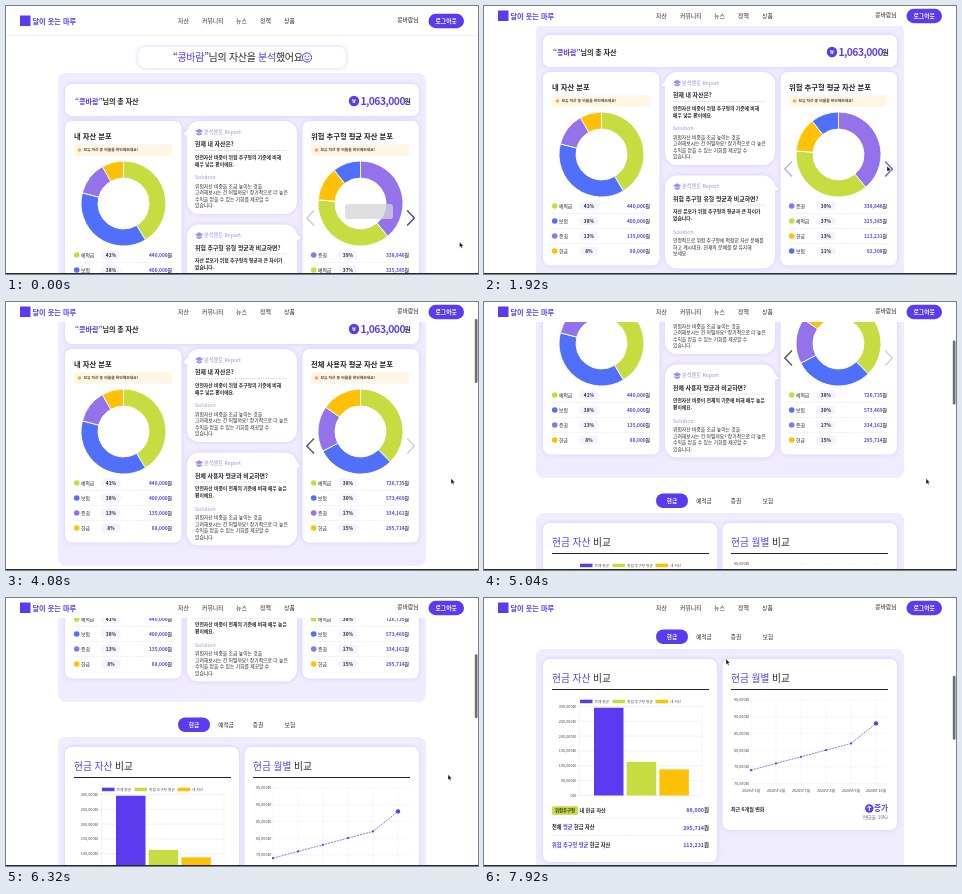
Animation, 472 px wide and 268 px high, one loop 8 s. Source, as an HTML page:

```html
<!DOCTYPE html>
<html lang="ko">
<head>
<meta charset="utf-8">
<title>자산 분석</title>
<style>
html,body{margin:0;width:100%;height:100%;overflow:hidden;background:#fff}
svg{display:block;width:472px;height:268px}
text{font-family:"Noto Sans CJK KR","Noto Sans CJK JP","Noto Sans CJK","Noto Sans",sans-serif;white-space:pre}
.glow{filter:drop-shadow(0 0 2px #d3c8ff)}
</style>
</head>
<body>
<svg id="stage" viewBox="0 0 472 268"></svg>
<script>
const NS = 'http://www.w3.org/2000/svg';
const MAIN = '#5a3bf0', INK = '#26262b', SOFT = '#a08df2', LAV = '#f0ecff';
const LIME = '#c6dc40', BLUE = '#5070fb', VIOLET = '#9473ea', GOLD = '#ffc107';
const LOOP = 8000, SWAP = 2240;
const USER = '콩바람';
const stage = document.getElementById('stage');

function el(parent, tag, attrs = {}) {
  const e = document.createElementNS(NS, tag);
  for (const k in attrs) e.setAttribute(k, attrs[k]);
  parent.appendChild(e);
  return e;
}
const group = p => el(p, 'g');
const box = (p, x, y, w, h, fill, r = 0, extra = {}) =>
  el(p, 'rect', { x, y, width: w, height: h, rx: r, fill, ...extra });
const card = (p, x, y, w, h, r = 7) => box(p, x, y, w, h, '#fff', r, { class: 'glow' });
const dot = (p, cx, cy, r, fill) => el(p, 'circle', { cx, cy, r, fill });
const path = (p, d, stroke, width = 1, extra = {}) =>
  el(p, 'path', { d, stroke, 'stroke-width': width, fill: 'none', ...extra });
const rule = (p, x1, x2, y, color = '#d9d7e2') =>
  path(p, `M${x1} ${y}H${x2}`, color, 0.5, { 'stroke-dasharray': '1.2 1' });

// Text centred on y; parts between asterisks take the accent colour.
function text(p, x, y, str, size, o = {}) {
  const t = el(p, 'text', {
    x, y: y + size * 0.37, 'font-size': size, 'font-weight': o.w || 400,
    fill: o.fill || INK, 'text-anchor': o.a || 'start', 'letter-spacing': (o.ls || 0) * size
  });
  str.split('*').forEach((s, i) => {
    if (s) el(t, 'tspan', i % 2 ? { fill: MAIN } : {}).textContent = s;
  });
  return t;
}

const page = group(stage);

// Headline and total
card(page, 132, 41, 208, 21);
text(page, 167, 51.5, `“*${USER}*”님의 자산을 *분석*했어요`, 10, { w: 500, ls: -0.03 });
el(page, 'circle', { cx: 301, cy: 51.5, r: 4.6, fill: 'none', stroke: MAIN, 'stroke-width': 1 });
path(page, 'M298.7 52.6Q301 55.6 303.3 52.6', MAIN, 0.9);
dot(page, 299.4, 50.2, 0.7, MAIN);
dot(page, 302.6, 50.2, 0.7, MAIN);

box(page, 52, 67, 368, 265, LAV, 8);
card(page, 59, 78, 354, 32);
text(page, 69, 95.5, `*“${USER}”*님의 총 자산`, 7.1, { w: 700, ls: -0.01 });
dot(page, 348, 95, 5.2, MAIN);
text(page, 348, 95, '₩', 5.6, { fill: '#fff', a: 'middle', w: 700 });
text(page, 399, 95, '*1,063,000*', 10.3, { w: 700, a: 'end', ls: -0.05 });
text(page, 398.6, 95.6, '원', 6.8, { w: 700 });

// Donut charts
function ring(x, a, b) {
  const pt = (r, q) => `${(x + r * Math.sin(q)).toFixed(2)} ${(197.5 - r * Math.cos(q)).toFixed(2)}`;
  const R = 42.5, r = 25.5, big = b - a > Math.PI ? 1 : 0;
  return `M${pt(R, a)}A${R} ${R} 0 ${big} 1 ${pt(R, b)}L${pt(r, b)}A${r} ${r} 0 ${big} 0 ${pt(r, a)}Z`;
}
const shares = vals => {
  const sum = vals.reduce((a, b) => a + b);
  return vals.map(v => v / sum);
};
function donut(p, x) {
  const arcs = [0, 1, 2, 3].map(() => path(p, '', '#fff', 0.9));
  return (parts, colors) => {
    let a = 0;
    parts.forEach((s, i) => {
      const b = a + s * Math.PI * 2;
      arcs[i].setAttribute('d', ring(x, a, b));
      arcs[i].setAttribute('fill', colors[i]);
      a = b;
    });
  };
}
function assetHead(p, x, title) {
  text(p, x, 130, title, 7.3, { w: 700 });
  box(p, x, 138, 98, 12, '#fff6e5', 2);
  dot(p, x + 5.5, 144, 1.8, '#f6a94a');
  text(p, x + 9.5, 144, '보유 자산 중 비율을 확인해보세요!', 3.8, { w: 700, fill: '#54442e' });
}
function assetRows(p, x, set) {
  shares(set.vals).forEach((s, i) => {
    const y = 249 + i * 15;
    dot(p, x + 2.7, y, 2.8, set.colors[i]);
    text(p, x + 7, y, set.names[i], 4.8, { w: 500 });
    box(p, x + 27, y - 4.5, 20, 9, '#f5f3ff', 4.5);
    text(p, x + 37, y, Math.round(s * 100) + '%', 4.8, { w: 700, a: 'middle' });
    text(p, x + 98, y, `*${set.vals[i].toLocaleString('en-US')}*원`, 4.8, { w: 700, a: 'end' });
    if (i < 3) rule(p, x, x + 98, y + 7.5);
  });
}
const mine = { names: ['예적금', '보험', '증권', '현금'], vals: [440000, 400000, 135000, 88000], colors: [LIME, BLUE, VIOLET, GOLD] };
const risk = { names: ['증권', '예적금', '현금', '보험'], vals: [338846, 325385, 113231, 92308], colors: [VIOLET, LIME, GOLD, BLUE] };
const all = { names: mine.names, vals: [726735, 573469, 334161, 295714], colors: mine.colors };

card(page, 59, 115, 116.5, 193.5);
assetHead(page, 68, '내 자산 분포');
donut(page, 117.5)(shares(mine.vals), mine.colors);
assetRows(page, 68, mine);

card(page, 296.5, 115, 116.5, 193.5);
const views = [group(page), group(page)];
assetHead(views[0], 305, '위험 추구형 평균 자산 분포');
assetHead(views[1], 305, '전체 사용자 평균 자산 분포');
assetRows(views[0], 305, risk);
assetRows(views[1], 305, all);
const drawAvg = donut(page, 354.5);
const tip = box(page, 339, 198, 48, 15, '#d4d4d8', 3);
const prev = path(page, 'M308 204.5L300.8 212L308 219.5', '#ccc', 1.4);
const next = path(page, 'M401.2 204.5L408.4 212L401.2 219.5', '#ccc', 1.4);

// Report bubbles
function bubble(y, tail) {
  const g = el(page, 'g', { class: 'glow' });
  box(g, 181, y, 110, 93, '#fff', 12);
  el(g, 'path', { d: tail, fill: '#fff' });
  const icon = el(page, 'g', { fill: SOFT });
  el(icon, 'path', { d: `M189 ${y + 10}l4.2 -2.2l4.2 2.2l-4.2 2.2z` });
  el(icon, 'path', { d: `M190.6 ${y + 11.4}l2.6 1.4l2.6 -1.4v2.2q-2.6 1.6 -5.2 0z` });
  text(page, 198, y + 11, '분석멘토 Report', 5.2, { w: 500, fill: SOFT });
  rule(page, 189, 281, y + 29.5, '#aaa7b8');
  text(page, 189, y + 56.5, 'Solution', 5.2, { w: 500, fill: SOFT });
}
function report(p, y, title, body, tips) {
  text(p, 189, y + 23, title, 5.9, { w: 700 });
  body.forEach((s, i) => text(p, 189, y + 36.2 + i * 6.7, s, 4.8, { w: 700 }));
  tips.forEach((s, i) => text(p, 189, y + 65 + i * 6.5, s, 4.8));
}
const advice = ['위험자산 비중을 조금 높이는 것을', '고려해보시는 건 어떨까요? 장기적으로 더 높은', '수익을 얻을 수 있는 기회를 제공할 수', '있습니다.'];
bubble(115, 'M183 122L177.5 128L183 132Z');
bubble(218.5, 'M289 226L294.5 232L289 236Z');
report(page, 115, '현재 내 자산은?', ['안전자산 비중이 위험 추구형의 기준에 비해', '매우 낮은 편이에요.'], advice);
report(views[0], 218.5, '위험 추구형 유형 평균과 비교하면?', ['자산 분포가 위험 추구형의 평균과 큰 차이가', '없습니다.'],
  ['안정적으로 위험 추구형에 적합한 자산 분배를', '하고 계시네요. 현재의 분배를 잘 유지해', '보세요.']);
report(views[1], 218.5, '전체 사용자 평균과 비교하면?', ['안전자산 비중이 전체의 기준에 비해 매우 높은', '편이에요.'], advice);
views.forEach(v => page.appendChild(v));

// Tabs
box(page, 172, 347.5, 32, 14.5, MAIN, 7.2);
['현금', '예적금', '증권', '보험'].forEach((s, i) =>
  text(page, 188 + i * 32, 354.8, s, 5.6, { w: i ? 500 : 700, a: 'middle', fill: i ? INK : '#fff' }));

// Comparison cards
box(page, 52, 367, 368, 260, LAV, 8);
card(page, 59, 377, 174, 203);
card(page, 238.5, 377, 174.5, 171);
[[68, '자산'], [247, '월별']].forEach(([x, s]) => {
  text(page, x, 396.5, `*현금 ${s}* 비교`, 9.7);
  box(page, x, 407, 157, 1, '#222');
});

[[96, MAIN, '전체 평균'], [128.5, LIME, '위험 추구형 평균'], [171.5, GOLD, '내 자산']].forEach(([x, c, s]) => {
  box(page, x, 417.7, 12.5, 3.5, c);
  text(page, x + 14.5, 419.5, s, 3.7, { fill: '#555' });
});
for (let i = 0; i <= 6; i++) {
  const y = 424.5 + i * 14.83;
  path(page, `M93 ${y}H218`, '#e3e3e6', 0.5);
  text(page, 92, y, (300000 - i * 50000).toLocaleString('en-US') + '원', 3.8, { a: 'end', fill: '#444' });
}
path(page, 'M95.5 424.5V513.5M218 424.5V513.5', '#e9e9ec', 0.5);
[[295714, MAIN], [113231, LIME], [88000, GOLD]].forEach(([v, c], i) => {
  const h = v / 300000 * 89;
  box(page, 110 + i * 32.7, 513.5 - h, 29.5, h, c);
});

box(page, 68, 524.3, 26, 8.5, LIME, 1.5);
text(page, 81, 528.5, '위험추구형', 4.3, { w: 700, a: 'middle' });
text(page, 95.5, 528.5, '내 현금 자산', 5.1, { w: 700 });
text(page, 68, 545.5, '전체 *평균* 현금 자산', 5.2, { w: 700 });
text(page, 68, 563, '*위험 추구형 평균* 현금 자산', 5.2, { w: 700 });
['88,000', '295,714', '113,231'].forEach((s, i) => {
  text(page, 225, 528.5 + i * 17.3, `*${s}*원`, 5.4, { w: 700, a: 'end' });
  if (i < 2) rule(page, 68, 225, 536 + i * 17.5);
});

for (let i = 0; i < 6; i++) {
  const y = 418 + i * 16.7, x = 267 + i * 25;
  path(page, `M266 ${y}H404M${x} 418V501.5`, '#eeeef1', 0.5);
  text(page, 265, y, `${95 - i * 5},000원`, 3.8, { a: 'end', fill: '#444' });
  text(page, x, 509, `2024년 ${5 + i}월`, 3.7, { a: 'middle', fill: '#444' });
}
const trend = [74, 76, 78, 80, 82, 88].map((v, i) => [267 + i * 25, 501.5 - (v - 70) * 3.34]);
path(page, 'M' + trend.join('L'), MAIN, 0.7, { 'stroke-dasharray': '2 1' });
trend.forEach(([x, y], i) => dot(page, x, y, i < 5 ? 1.1 : 2.2, MAIN));
text(page, 247, 527, '최근 6개월 변화', 5, { w: 700 });
dot(page, 385.3, 526.5, 4.2, MAIN);
path(page, 'M385.3 529V524.2M383.2 526.2L385.3 524L387.4 526.2', '#fff', 1);
text(page, 404, 526.5, '*증가*', 7.6, { w: 700, a: 'end' });
text(page, 404, 535, '(변화율: 10%)', 4.2, { a: 'end', fill: '#666' });

// Fixed header
const headBg = box(stage, 0, 0, 472, 29.5, '#fff');
const headLine = box(stage, 0, 29, 472, 0.6, '#e8e8ec');
const head = group(stage);
box(head, 14, 9.5, 10.5, 10.5, MAIN);
text(head, 26.5, 15, '달이 웃는 마루', 7.2, { w: 900, fill: MAIN });
[[172, '자산'], [196, '커뮤니티'], [230, '뉴스'], [254, '정책'], [278, '상품']].forEach(([x, s]) =>
  text(head, x, 15, s, 5.9, { w: 500 }));
text(head, 391, 14.3, USER + '님', 5.9, { w: 500 });
box(head, 422.5, 7.8, 35.5, 14.4, MAIN, 7.2);
text(head, 440.2, 15, '로그아웃', 5.8, { w: 700, a: 'middle', fill: '#fff' });

const thumb = box(stage, 468.8, 0, 2.7, 64, '#6f6f72', 1.3);
const cursor = el(stage, 'path', { d: 'M0 0V5.6L1.3 4.4L2.2 6.3L3.1 5.9L2.3 4.1H4Z', fill: '#111', stroke: '#fff', 'stroke-width': 0.4 });
box(stage, 0, 267, 472, 1, '#2a2a2a');

// Moves: start, end, target values
const scrolls = [[80, 640, 49], [3120, 3520, 68], [4480, 5000, 156], [5920, 6320, 228], [6560, 7280, 316]];
const moves = [[960, 1600, 403, 160], [2720, 3000, 443, 176], [3520, 4000, 445, 176.5], [4480, 4900, 442, 176.5], [7360, 7840, 242, 61]];
const clamp = v => Math.max(0, Math.min(1, v));
const ease = v => v * v * (3 - 2 * v);
const mix = (a, b, k) => a + (b - a) * k;
const span = (t, a, b) => ease(clamp((t - a) / (b - a)));
const follow = (t, start, keys, n) => keys.reduce((v, k) => mix(v, k[n], span(t, k[0], k[1])), start);
const from = shares(risk.vals), to = shares(all.vals);

function draw(t) {
  const s = follow(t, 0, scrolls, 2);
  page.setAttribute('transform', `translate(0 ${-s.toFixed(2)})`);

  const k = span(t, 80, 480);
  headBg.setAttribute('height', mix(29.5, 20, k));
  headLine.setAttribute('y', mix(29, 19.5, k));
  headLine.setAttribute('opacity', 1 - k);
  head.setAttribute('transform', `translate(0 ${-5 * k})`);

  const second = t >= SWAP;
  views[0].setAttribute('display', second ? 'none' : 'inline');
  views[1].setAttribute('display', second ? 'inline' : 'none');
  const m = 1 - Math.pow(1 - clamp((t - SWAP) / 400), 4);
  drawAvg(from.map((v, i) => mix(v, to[i], m)), second ? all.colors : risk.colors);
  tip.setAttribute('opacity', 0.75 * (1 - span(t, 0, 240)));

  const hover = t >= 1500 && t < 3360;
  const on = hover ? MAIN : '#55535f';
  prev.setAttribute('stroke', second ? on : hover ? '#b9adf6' : '#ccc');
  next.setAttribute('stroke', second ? '#d0d0d4' : hover ? '#6f62c8' : '#4a4488');

  thumb.setAttribute('y', s * 0.245 + 0.3);
  thumb.setAttribute('opacity', Math.max(...scrolls.map(([a, b]) =>
    t > a ? 1 - clamp((t - b - 700) / 200) : 0)));
  cursor.setAttribute('transform', `translate(${follow(t, 453.5, moves, 2)} ${follow(t, 236, moves, 3)})`);
}

const begin = performance.now();
function tick() {
  draw((performance.now() - begin) % LOOP);
  requestAnimationFrame(tick);
}
draw(0);
requestAnimationFrame(tick);
</script>
</body>
</html>
```
